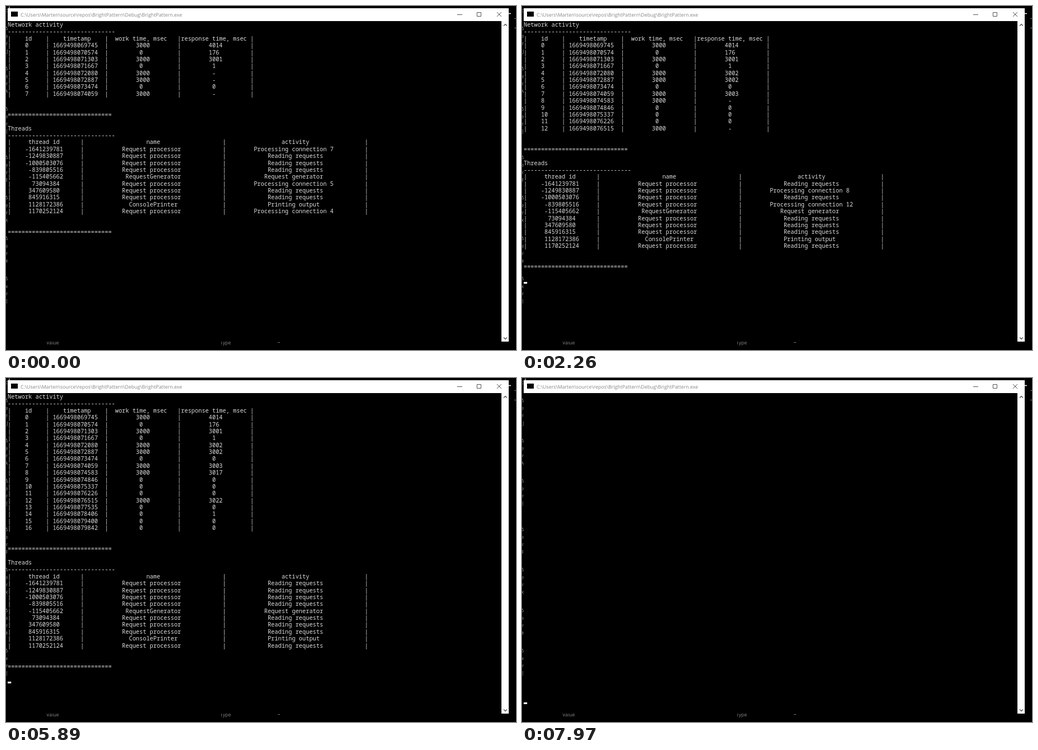
Write an HTML page that moves like this. It is 910 by 616 pixels and loops after 8 s.

```html
<!DOCTYPE html>
<html lang="en">
<head>
<meta charset="utf-8">
<title>Console monitor</title>
<style>
  html, body { margin: 0; width: 100%; height: 100%; overflow: hidden; background: #000; }
  svg { position: absolute; left: 0; top: 0; }
  svg text { font: 8.8px "Open Sans", "Noto Sans", sans-serif; fill: #858585; text-rendering: geometricPrecision; }
  /* 8 x 16 character cells, shown at a reduced scale */
  #console { position: absolute; left: 3px; top: 27px; transform: scale(.7735); transform-origin: 0 0; }
  pre { margin: 0; font: 13.3333px/16px "Noto Sans Mono", monospace; color: #dcdcdc; }
  #cursor { position: absolute; left: 0; width: 8px; height: 4px; background: #fff; }
</style>
</head>
<body>
<svg width="910" height="616" viewBox="0 0 910 616">
  <g id="edge" text-anchor="end"></g>
  <text x="72" y="606">Value</text>
  <text x="382" y="606">Type</text>
  <path d="M485 602.5h4M907 22.5h3M907 39.5h3" stroke="#777"/>
  <path d="M897 13.5h4" stroke="#fff" stroke-width="1.5"/>
  <rect id="caret" x="5" y="1" width="1.5" height="3" fill="#bbb"/>
  <path d="M3 4H897V601H3z"/>
  <path d="M3 4H897V601H884V27H3z" fill="#fff"/>
  <rect x="9" y="10" width="12" height="9"/>
  <text x="26" y="18.5">C:\Users\Marten\source\repos\BrightPattern\Debug\BrightPattern.exe</text>
  <g fill="none" stroke="#555">
    <path d="M805 15.5h9M840.5 11.5h7v7h-7zM876 11l8 8M884 11l-8 8"/>
    <path d="M888 35.5l3-3 3 3M888 593.5l3 3 3-3" stroke-width="1.4"/>
  </g>
</svg>
<div id="console"><pre id="screen"></pre><div id="cursor"></div></div>
<script>
const LOOP = 8000;
const $ = id => document.getElementById(id);

// Connections: timestamp offset, work time, response time, shown at, finished at, worker
const connections = [
  [69745, 3000, 4014], [70574, 0, 176], [71303, 3000, 3001], [71667, 0, 1],
  [72080, 3000, 3002, 0, 320, 9], [72887, 3000, 3002, 0, 1320, 5], [73474, 0, 0],
  [74059, 3000, 3003, 0, 2260, 0], [74583, 3000, 3017, 120, 2870, 1], [74846, 0, 0, 120],
  [75337, 0, 0, 580], [76226, 0, 0, 1520], [76515, 3000, 3022, 1790, 4890, 3],
  [77535, 0, 0, 2870], [78406, 0, 1, 3610], [79400, 0, 0, 4600], [79842, 0, 0, 5160],
  [80728, 0, 1, 6090], [81254, 0, 0, 6560], [82171, 0, 0, 7370]
].map(([stamp, work, response, shown = 0, done = shown, worker], id) =>
  ({ id, stamp: 1669498e6 + stamp, work, response, shown, done, worker }));

const threads = [-1641239781, -1249830887, -1000503076, -839805516, -115405662,
  73094384, 347609580, 845916315, 1128172386, 1170252124];
const special = { 4: ["RequestGenerator", "Request generator"], 8: ["ConsolePrinter", "Printing output"] };

const cleared = [[1390, 1520], [2530, 2600], [3740, 3810], [5090, 5160], [6490, 6560], [7770, LOOP]];
const cursorHidden = [[0, 70], [2600, 2670], [3810, 3940]];
const within = (spans, t) => spans.some(([from, to]) => t >= from && t < to);

function center(value, width) {
  const text = String(value);
  return text.padStart(text.length + Math.floor((width - text.length) / 2)).padEnd(width);
}
const row = (cells, widths) => "|" + cells.map((c, i) => center(c, widths[i]) + "|").join("");
const dashes = "-".repeat(31), rule = "=".repeat(30);
const netRow = (...cells) => row(cells, [10, 16, 20, 20]);
const threadRow = (...cells) => row(cells, [20, 40, 40]);

function report(list, t) {
  const activity = i => {
    const job = list.find(c => c.worker === i && t < c.done);
    return job ? "Processing connection " + job.id : "Reading requests";
  };
  return [
    "Network activity", dashes,
    netRow("id", "timetamp", "work time, msec", "response time, msec"),
    ...list.map(c => netRow(c.id, c.stamp, c.work, t < c.done ? "-" : c.response)),
    "", "", rule, "", "Threads", dashes,
    threadRow("thread id", "name", "activity"),
    ...threads.map((id, i) => threadRow(id, ...(special[i] || ["Request processor", activity(i)]))),
    "", "", rule
  ].join("\n");
}

// Letters of the window behind, peeking out at the left edge
let edge = '<text x="3" y="11">c</text>';
[40, 112, 184, 271, 343, 416, 488].forEach((y, i) => {
  ["Δ", i == 6 ? "x" : "e", "r", "JAEFX#E"[i]].forEach((ch, k) => {
    edge += `<text x="3.5" y="${y + 3 + k * 13.7}">${ch}</text>`;
  });
});
$("edge").innerHTML = edge;

let last;
function draw() {
  const t = performance.now() % LOOP;
  const list = connections.filter(c => t >= c.shown);
  const text = within(cleared, t) ? "" : report(list, t);
  if (text !== last) $("screen").textContent = last = text;
  $("cursor").style.top = (list.length + 25) * 16 - 4 + "px";
  $("cursor").style.visibility = within(cursorHidden, t) ? "hidden" : "visible";
  $("caret").style.visibility = Math.floor((t - 50) / 528) % 2 ? "visible" : "hidden";
  requestAnimationFrame(draw);
}
draw();
</script>
</body>
</html>
```
